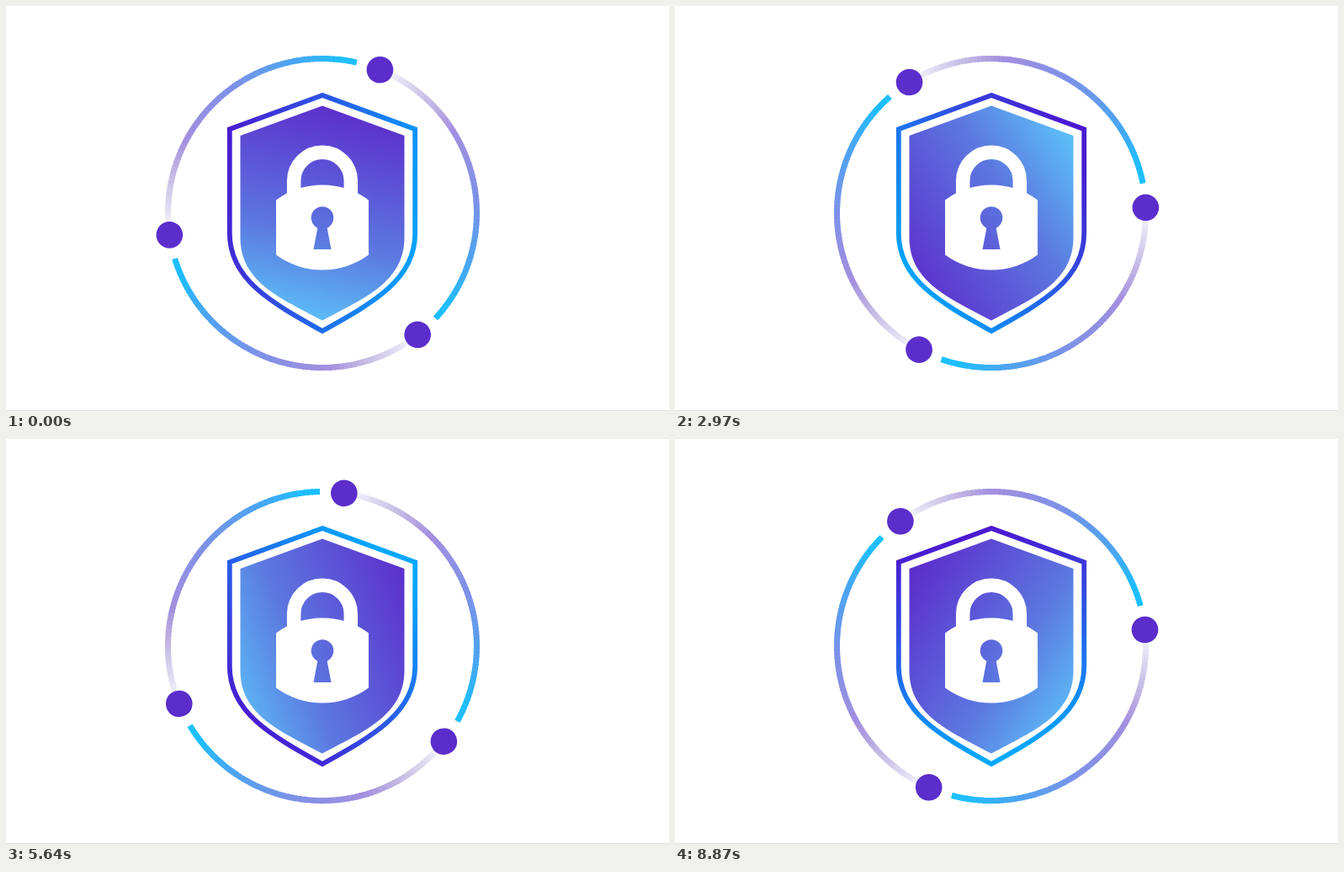
Recreate the animation shown at these times as an HTML page. Size 788 by 481 pixels, loop 8.92 s.

```html
<!DOCTYPE html>
<html lang="en">
<head>
<meta charset="utf-8">
<title>Security shield</title>
<style>
  html, body { margin: 0; width: 100%; height: 100%; overflow: hidden; background: #fff; }
  svg { display: block; width: 788px; height: 481px; }
</style>
</head>
<body>
<svg viewBox="0 0 788 481" xmlns="http://www.w3.org/2000/svg">
  <defs>
    <linearGradient id="fill" gradientUnits="userSpaceOnUse">
      <stop offset="0" stop-color="#5c2fcc"/>
      <stop offset=".62" stop-color="#5c78e0"/>
      <stop offset="1" stop-color="#5cbcf6"/>
    </linearGradient>
    <linearGradient id="edge" gradientUnits="userSpaceOnUse">
      <stop offset="0" stop-color="#4a1ad0"/>
      <stop offset="1" stop-color="#02a8ff"/>
    </linearGradient>
  </defs>
  <rect y="480" width="788" height="1" fill="#e0e0e0"/>
  <g id="orbit"></g>
  <path d="M376 106L486.2 146.2V270C486.2 325 437 352 376 386C315 352 265.8 325 265.8 270V146.2Z"
        fill="#fff" stroke="url(#edge)" stroke-width="5.8"/>
  <path d="M376 118.5L473.5 154V275C473.5 327 428 346 376 373.5C324 346 278.5 327 278.5 275V154Z" fill="url(#fill)"/>
  <path d="M342.2 226V207.5A33.8 33.8 0 0 1 409.8 207.5V226" fill="none" stroke="#fff" stroke-width="16.5"/>
  <path d="M321 230.5A93 93 0 0 1 431 230.5V295.5A93 93 0 0 1 321 295.5Z" fill="#fff"/>
  <g fill="url(#fill)">
    <circle cx="376" cy="251.5" r="13.3"/>
    <path d="M371 260H381L386.5 289H365.5Z"/>
  </g>
</svg>
<script>
const LOOP = 8920, TICKS = 174, TICK = LOOP / TICKS;
const CX = 376, CY = 246, RADIUS = 183.5;
const ARC_SPAN = 111;

// [tick, orbit angle in degrees]
const KEYS = [
  [0, 21.9], [1, 27], [4, 37.5], [7, 46.6], [10, 55.6], [27, 112.8],
  [41, 157.8], [45, 168.2], [63, 223.2], [74, 257.9], [81, 281.3],
  [97, 327.8], [112, 374.3], [116, 378], [120, 389], [123, 405],
  [127, 419.9], [146, 480], [173, 563.9], [174, 567]
];
// Stretches where the motion stutters and each pose is held
const HOLDS = [[0, 10], [112, 123]];

// [degrees behind the dot, colour]
const TRAIL = [
  [0, [255, 255, 255]], [8, [230, 227, 244]], [22, [196, 186, 228]],
  [36, [164, 143, 223]], [62, [125, 145, 231]], [86, [78, 163, 241]],
  [104, [31, 189, 255]], [ARC_SPAN, [28, 192, 255]]
];

const mix = (a, b, u) => a + (b - a) * u;

function bracket(list, x) {
  let i = 0;
  while (i < list.length - 2 && list[i + 1][0] <= x) i++;
  const [a, b] = [list[i], list[i + 1]];
  return [a[1], b[1], (x - a[0]) / (b[0] - a[0])];
}

// Angles run clockwise from the top
function polar(deg, r) {
  const a = deg * Math.PI / 180;
  return [CX + r * Math.sin(a), CY - r * Math.cos(a)];
}

function trailColor(deg) {
  const [a, b, u] = bracket(TRAIL, deg);
  return `rgb(${a.map((c, i) => Math.round(mix(c, b[i], u)))})`;
}

function add(parent, tag, attrs) {
  const el = document.createElementNS('http://www.w3.org/2000/svg', tag);
  for (const name in attrs) el.setAttribute(name, attrs[name]);
  parent.appendChild(el);
}

const orbit = document.getElementById('orbit');

function buildOrbit() {
  const step = 1.5;
  for (const base of [0, 120, 240]) {
    for (let d = 0; d < ARC_SPAN; d += step) {
      const end = Math.min(d + step + 0.5, ARC_SPAN);
      add(orbit, 'path', {
        d: `M${polar(base + d, RADIUS)}A${RADIUS} ${RADIUS} 0 0 1 ${polar(base + end, RADIUS)}`,
        fill: 'none', stroke: trailColor(d + step / 2), 'stroke-width': 7
      });
    }
  }
  for (const base of [0, 120, 240]) {
    const [cx, cy] = polar(base, RADIUS);
    add(orbit, 'circle', { cx, cy, r: 15.8, fill: '#5b2dcb' });
  }
}

function orbitAngle(tick) {
  const [a, b, u] = bracket(KEYS, tick);
  const held = HOLDS.some(([from, to]) => tick >= from && tick < to);
  return held ? a : mix(a, b, u);
}

function aimGradient(id, deg, half) {
  const el = document.getElementById(id);
  const [x1, y1] = polar(deg + 180, half);
  const [x2, y2] = polar(deg, half);
  Object.entries({ x1, y1, x2, y2 }).forEach(([k, v]) => el.setAttribute(k, v));
}

function render(ms) {
  const tick = Math.floor((ms % LOOP + 5) / TICK) % TICKS;
  const angle = orbitAngle(tick);
  const turn = (angle - 30) * 1.2; // gradients turn in 5 s, the orbit in 6 s
  orbit.setAttribute('transform', `rotate(${angle} ${CX} ${CY})`);
  aimGradient('fill', 203 + turn, 125);
  aimGradient('edge', 90 - turn, 130);
}

buildOrbit();
const start = performance.now();
function loop() {
  render(performance.now() - start);
  requestAnimationFrame(loop);
}
loop();
</script>
</body>
</html>
```
